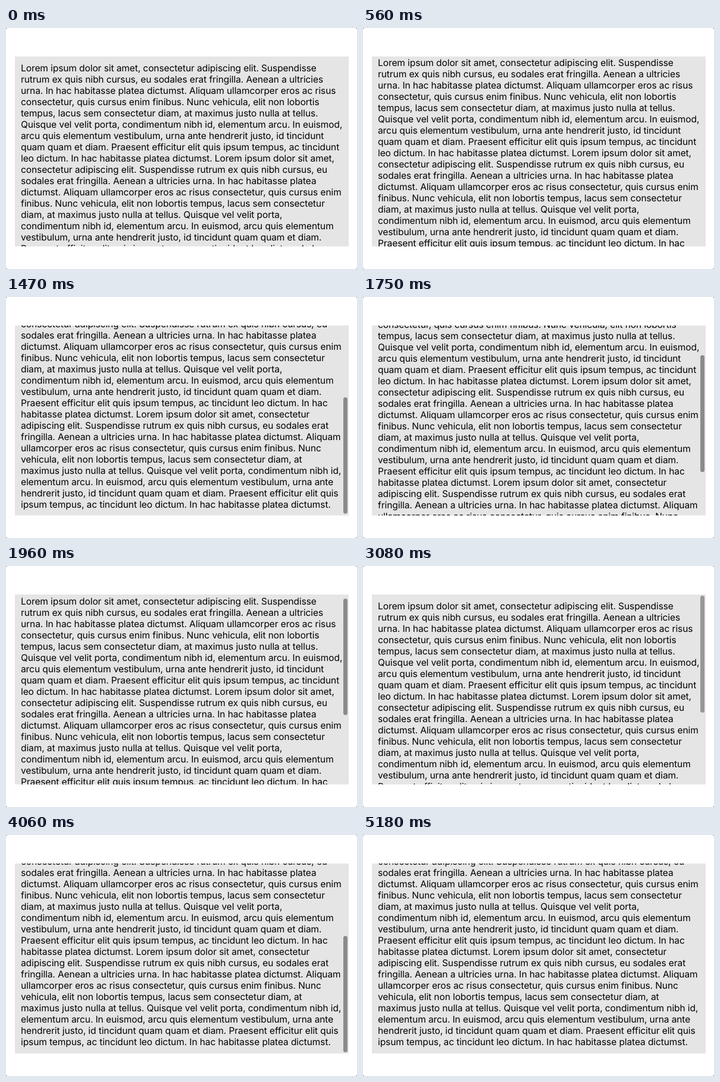
An HTML page that plays this animation: 590x406 px, repeating every 6020 ms.

```html
<!DOCTYPE html>
<html lang="la">
<head>
<meta charset="utf-8">
<title>Scrolling text</title>
<style>
html, body { margin: 0; width: 100%; height: 100%; overflow: hidden; background: #777; }
#page { position: absolute; inset: 0; background: #fff; border-radius: 3px; }
#panel { position: absolute; left: 15px; top: 48px; width: 561px; height: 320px; overflow: hidden; background: #e5e5e5; }
#text {
  position: absolute; left: 10px; top: 10px; margin: 0; white-space: pre; color: #000;
  font: 15.5px/19px Inter, "Liberation Sans", sans-serif;
  font-optical-sizing: none; letter-spacing: -0.085px;
  text-rendering: geometricPrecision; -webkit-font-smoothing: antialiased;
}
#thumb { position: absolute; right: 2px; width: 7px; height: 196.5px; border-radius: 3.5px; background: #8b8b8b; }
</style>
</head>
<body>
<div id="page"><div id="panel">
<p id="text">Lorem ipsum dolor sit amet, consectetur adipiscing elit. Suspendisse
rutrum ex quis nibh cursus, eu sodales erat fringilla. Aenean a ultricies
urna. In hac habitasse platea dictumst. Aliquam ullamcorper eros ac risus
consectetur, quis cursus enim finibus. Nunc vehicula, elit non lobortis
tempus, lacus sem consectetur diam, at maximus justo nulla at tellus.
Quisque vel velit porta, condimentum nibh id, elementum arcu. In euismod,
arcu quis elementum vestibulum, urna ante hendrerit justo, id tincidunt
quam quam et diam. Praesent efficitur elit quis ipsum tempus, ac tincidunt
leo dictum. In hac habitasse platea dictumst. Lorem ipsum dolor sit amet,
consectetur adipiscing elit. Suspendisse rutrum ex quis nibh cursus, eu
sodales erat fringilla. Aenean a ultricies urna. In hac habitasse platea
dictumst. Aliquam ullamcorper eros ac risus consectetur, quis cursus enim
finibus. Nunc vehicula, elit non lobortis tempus, lacus sem consectetur
diam, at maximus justo nulla at tellus. Quisque vel velit porta,
condimentum nibh id, elementum arcu. In euismod, arcu quis elementum
vestibulum, urna ante hendrerit justo, id tincidunt quam quam et diam.
Praesent efficitur elit quis ipsum tempus, ac tincidunt leo dictum. In hac
habitasse platea dictumst. Lorem ipsum dolor sit amet, consectetur
adipiscing elit. Suspendisse rutrum ex quis nibh cursus, eu sodales erat
fringilla. Aenean a ultricies urna. In hac habitasse platea dictumst. Aliquam
ullamcorper eros ac risus consectetur, quis cursus enim finibus. Nunc
vehicula, elit non lobortis tempus, lacus sem consectetur diam, at
maximus justo nulla at tellus. Quisque vel velit porta, condimentum nibh id,
elementum arcu. In euismod, arcu quis elementum vestibulum, urna ante
hendrerit justo, id tincidunt quam quam et diam. Praesent efficitur elit quis
ipsum tempus, ac tincidunt leo dictum. In hac habitasse platea dictumst.</p>
<div id="thumb"></div>
</div></div>
<script>
const LOOP = 6020, STEP = 70, MAX_SCROLL = 194, TRAVEL = 119.5;
const text = document.getElementById('text');
const thumb = document.getElementById('thumb');

const ramp = (t, from, to) => Math.min(1, Math.max(0, (t - from) / (to - from)));

// A flick: quick pick-up, then a longer slowdown
const flick = (t, from, to) => 1 - (1 - ramp(t, from, to) ** 1.3) ** 1.71;

// Down, back up, down again
const scrollAt = t => Math.round(MAX_SCROLL *
  (flick(t, 537, 910) - flick(t, 1463, 2030) + flick(t, 3687, 4060)));

// The scrollbar appears at once and fades after a pause
function thumbAlpha(t) {
  if (t < 630) return 0;
  return t < 3780 ? 1 - ramp(t, 3045, 3285) : 1 - ramp(t, 4935, 5175);
}

function draw(now) {
  const t = Math.floor((now - start) % LOOP / STEP) * STEP;
  const y = scrollAt(t);
  text.style.top = 10 - y + 'px';
  thumb.style.top = 2 + TRAVEL * y / MAX_SCROLL + 'px';
  thumb.style.opacity = thumbAlpha(t);
}

const start = performance.now();
function frame() {
  draw(performance.now());
  requestAnimationFrame(frame);
}
frame();
</script>
</body>
</html>
```
